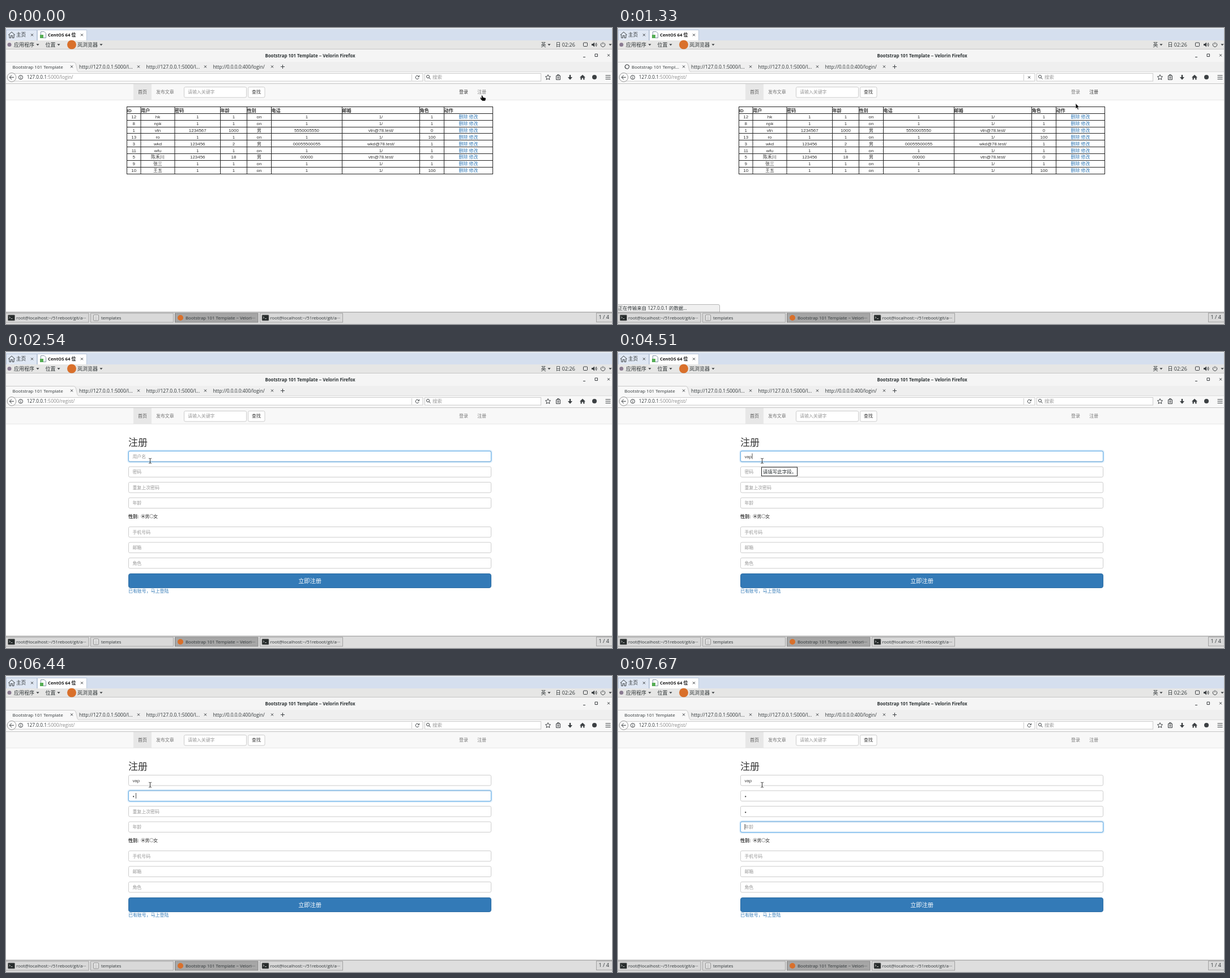
Recreate the animation shown at these times as an HTML page. Size 1070 px wide and 524 px high, loop 8000 ms.

```html
<!DOCTYPE html>
<html lang="zh-CN">
<head>
<meta charset="utf-8">
<title>Registration form</title>
<style>
html, body { margin: 0; width: 100%; height: 100%; overflow: hidden; background: #fff; }
svg { display: block; width: 1070px; height: 524px; }
text { white-space: pre; }
.ui { font: 8.3px "Open Sans", "Noto Sans CJK SC", sans-serif; fill: #2e3436; }
.web { font: 7.93px "Liberation Sans", "Noto Sans CJK SC", sans-serif; fill: #333; }
.panel { font-size: 9px; }
.task { font-size: 7.85px; }
.bold { font-weight: 700; }
.mid { text-anchor: middle; }
.muted { fill: #777; }
.hint { fill: #999; }
.link { fill: #337ab7; }
.line { fill: none; stroke: #3c4043; stroke-width: 1; }
.box { fill: #fff; stroke: #ccc; }
.glow { fill: none; stroke: #66afe9; }
.halo { stroke-width: 2.4; opacity: .65; filter: blur(1.3px); }
.button { fill: #d9d9d9; stroke: #a2a2a2; }
</style>
</head>
<body>
<svg viewBox="0 0 1070 524">
  <defs>
    <path id="x" class="line" d="M-2-2 2 2M2-2-2 2" stroke-width="1.3"/>
    <path id="down" d="M-2.6-1.2H2.6L0 1.8Z" fill="#3c4043"/>
    <g id="terminal">
      <rect width="12" height="10" rx="1" fill="#262b2b" stroke="#777" stroke-width=".8"/>
      <path d="M2 3l2 1.5L2 6M5 6.5h3" fill="none" stroke="#ddd" stroke-width=".8"/>
    </g>
  </defs>

  <g class="ui">
    <rect width="1070" height="23" fill="#d5dfee"/>
    <rect width="1070" height="1.5" fill="#eef2f8"/>
    <rect x=".5" y="3.5" width="54" height="19" fill="#dfe7f3" stroke="#bac7da"/>
    <path d="M55.500 23V3.500H142.500V23" fill="#fff" stroke="#bac7da"/>
    <path d="M4 12.500 10 7l6 5.500M6 11.500V17.500H8.700V13.500H11.300V17.500H14V11.500" class="line" stroke="#34547c"/>
    <text x="18" y="15.3" font-size="8.600">主页</text>
    <path d="M61.500 6.500h6l3 3v8h-9z" fill="#fff" stroke="#8292a6"/>
    <path d="M60 12h6v6h-6z" fill="#55ad54"/>
    <text x="74" y="15.2" class="bold" font-size="7.8" fill="#111">CentOS 64 位</text>
    <g stroke="#6d93c6"><use href="#x" x="46" y="12.300"/><use href="#x" x="134" y="12.300"/></g>

    <rect y="22" width="1070" height="16" fill="#e6e6e5"/>
    <rect y="37" width="1070" height="1" fill="#c6c6c6"/>
    <circle cx="6" cy="29.500" r="3.500" fill="#8a7b91"/>
    <g class="panel">
      <text x="14" y="32.600">应用程序</text>
      <text x="69.500" y="32.600">位置</text>
      <circle cx="116" cy="29.500" r="8" fill="#d9702b"/>
      <text x="126" y="32.600">岚浏览器</text>
      <text x="944.500" y="32.600">英</text>
      <text x="970.500" y="32.600">日 02:26</text>
    </g>
    <use href="#down" x="56" y="29.500"/><use href="#down" x="93" y="29.500"/><use href="#down" x="168" y="29.500"/>
    <use href="#down" x="959" y="29.500"/><use href="#down" x="1067" y="29.500"/>
    <rect x="1019.500" y="26" width="7" height="6.500" rx="1" class="line"/>
    <path d="M1034 28h2l3-2.500v8L1036 31h-2z" fill="#3c4043"/>
    <path d="M1040.500 27.500q1.500 2 0 4M1042 26q2.500 3.500 0 7" class="line" stroke-width=".8"/>
    <path d="M1052 26.500a3.700 3.700 0 1 0 4 0M1054 25v4" class="line"/>

    <rect y="38" width="1070" height="40" fill="#efefef"/>
    <rect y="38" width="1070" height="22" fill="#f5f5f5"/>
    <text x="537" y="52" class="bold mid" font-size="7.900">Bootstrap 101 Template − Velorin Firefox</text>
    <path d="M1019 51.500h4M1040 46h4.500v4.500h-4.500z" class="line" stroke-width="1.300"/>
    <use href="#x" x="1064" y="48.300"/>
    <path d="M0 78V60.500H119q4 0 5 6l1.500 7q1 4.500 5 4.500Z" fill="#f8f8f8"/>
    <path d="M0 60.500H119q4 0 5 6l1.500 7q1 4.500 5 4.500H1070" fill="none" stroke="#c9c9c9"/>
    <text id="tab" y="71.500" font-size="8"></text>
    <g id="spinner">
      <circle r="3.500" class="line" stroke="#c9c9c9"/>
      <path d="M0-3.500A3.500 3.500 0 0 1 3.500 0" class="line" stroke="#555"/>
    </g>
    <text x="129" y="71.500" font-size="8.500">http://127.0.0.1:5000/l...</text>
    <text x="247.500" y="71.500" font-size="8.500">http://127.0.0.1:5000/l...</text>
    <text x="365.500" y="71.500">http://0.0.0.0:400/login/</text>
    <use href="#x" x="116" y="68.400"/><use href="#x" x="234" y="68.400"/>
    <use href="#x" x="352" y="68.400"/><use href="#x" x="470" y="68.400"/>
    <path d="M485 68.500h7M488.500 65v7" class="line" stroke-width="1.400"/>

    <rect y="78" width="1070" height="21" fill="#f8f8f8"/>
    <rect x="14" y="80.500" width="722" height="13.500" class="box" stroke="#bbb"/>
    <rect x="739.500" y="80.500" width="205" height="13.500" class="box" stroke="#bbb"/>
    <circle cx="10" cy="87.300" r="7.800" fill="#fafafa" stroke="#999"/>
    <path d="M14 87.300H6.500M10 83.500 6.300 87.300 10 91" class="line" stroke-width="1.700"/>
    <circle cx="26" cy="87.300" r="3.600" class="line" stroke="#777" stroke-width=".8"/>
    <path d="M26 86.700v2.800M26 85v.9" class="line" stroke="#666"/>
    <text x="36.700" y="90.200" font-size="8.400">127.0.0.1<tspan id="path" fill="#8a8a8a"></tspan></text>
    <path d="M716.500 82v11" stroke="#ccc"/>
    <path id="reload" d="M728.500 85.500a3 3 0 1 0 .5 3M729.500 83.800v2.500h-2.500" class="line" stroke="#777"/>
    <use id="stop" href="#x" x="726" y="87.300"/>
    <circle cx="745" cy="86" r="2.500" class="line" stroke="#777"/><path d="M747 88l2.500 2.700" class="line" stroke="#777"/>
    <text x="753" y="90.300" class="hint" font-size="8.500">搜索</text>
    <path d="M957 82.700l1.400 3 3.200.3-2.400 2.200.7 3.200-2.900-1.700-2.900 1.700.7-3.200-2.400-2.200 3.200-.3z" class="line"/>
    <path d="M971.500 84.500h7v7h-7zM973.500 84v-1.500h3V84M973 87h4M973 89h4" class="line"/>
    <path d="M994.800 83h2.400v4h2.800l-4 4.700-4-4.700h2.800z" fill="#3c4043"/>
    <path d="M1013 87.500l5-4.700 5 4.700h-1.500v4h-2.300v-3h-2.400v3h-2.300v-4z" fill="#3c4043"/>
    <circle cx="1039" cy="87" r="4" fill="#3c4043"/>
    <path d="M1058.500 84h9M1058.500 87.200h9M1058.500 90.400h9" class="line" stroke-width="1.600"/>
    <path d="M0 98.500h1070" stroke="#c4c4c4"/>
  </g>

  <g class="web">
    <rect y="99" width="1070" height="28.500" fill="#f8f8f8"/>
    <path d="M0 127.500h1070" stroke="#e7e7e7"/>
    <rect x="225" y="99" width="32" height="28.500" fill="#e7e7e7"/>
    <text x="233" y="116.400" fill="#555">首页</text>
    <text x="265" y="116.400" class="muted">发布文章</text>
    <rect x="314.500" y="104.500" width="110" height="18.500" rx="2.300" class="box"/>
    <text x="321" y="116.400" class="hint">请输入关键字</text>
    <rect x="427.500" y="104.500" width="29.500" height="18.500" rx="2.300" class="box"/>
    <text x="434" y="116.400">查找</text>
    <text id="login" x="800" y="116.400">登录</text>
    <text id="regist" x="832.300" y="116.400">注册</text>

    <g id="table"></g>

    <g id="form">
      <text x="216" y="166.300" font-size="17" font-weight="500">注册</text>
      <g id="fields"></g>
      <text x="216" y="294.300" class="bold">性别:</text>
      <g fill="#fff" stroke="#888" stroke-width=".8"><circle cx="242" cy="290.700" r="3.300"/><circle cx="257" cy="290.700" r="3.300"/></g>
      <circle cx="242" cy="290.700" r="1.500"/>
      <text x="245.400" y="294.300">男</text><text x="260.200" y="294.300">女</text>
      <rect x="216.500" y="392.500" width="640" height="25" rx="3.400" fill="#337ab7" stroke="#2e6da4"/>
      <text x="536.500" y="408.700" class="mid" fill="#fff" font-size="10.200">立即注册</text>
      <text x="216" y="426.300" class="link">已有账号，马上登陆</text>
      <path id="caret" d="M0-5V5" stroke="#222" stroke-width=".8"/>
    </g>
  </g>

  <g id="tooltip" class="ui">
    <rect x="253.500" y="204" width="63" height="15.500" fill="#fff" stroke="#222"/>
    <text x="255.800" y="215" font-size="8.500">请填写此字段。</text>
  </g>

  <g id="status" class="ui">
    <path d="M-1 489.500H177q2.500 0 2.500 2.500V504H-1z" fill="#f0f0f0" stroke="#b5b5b5"/>
    <text id="statusText" x="0" y="499.300" font-size="8.400"></text>
  </g>

  <g class="ui task">
    <rect y="503" width="1070" height="21" fill="#dedede"/>
    <path d="M0 503h1070" stroke="#8d8d8d"/>
    <rect x="-1" y="505" width="147" height="16" class="button"/>
    <rect x="149.500" y="505" width="146" height="16" class="button"/>
    <rect x="298.500" y="505" width="146.500" height="16" class="button" style="fill:#a6a6a6;stroke:#858585"/>
    <rect x="448.500" y="505" width="146" height="16" class="button"/>
    <use href="#terminal" x="3.500" y="508"/><use href="#terminal" x="452" y="508"/>
    <rect x="154.500" y="508" width="9" height="10" rx="1" fill="#f4f4f4" stroke="#8b8b8b"/>
    <path d="M156 511h6M156 513.500h6M156 516h6" stroke="#999" stroke-width=".8"/>
    <circle cx="308" cy="513" r="5" fill="#d9702b"/>
    <text x="18" y="516.300">root@localhost:~/51reboot/git/a···</text>
    <text x="168" y="516.300" font-size="7.600">templates</text>
    <text x="317" y="516.300">Bootstrap 101 Template − Velori···</text>
    <text x="466.500" y="516.300">root@localhost:~/51reboot/git/a···</text>
    <rect x="1042.500" y="504.500" width="29" height="16" class="button"/>
    <text x="1046.500" y="515.300" font-size="9">1 / 4</text>
  </g>

  <g id="cursor" stroke-linejoin="round">
    <path id="hand" d="M0 0Q1.200-.8 2 .7L3 3.300 7 4.200Q8.300 5 7.500 7L6.500 9.500H1.500L-1.800 6Q-2-.1.500 5.200Z" fill="#000" stroke="#fff" stroke-width=".4"/>
    <path id="arrow" d="M0 0V9.500L2.200 7.500 3.800 11 5.400 10.300 3.800 7H6.800Z" fill="#000" stroke="#fff" stroke-width=".6"/>
    <path id="beam" d="M-2.300-4.500Q0-4.500 0-3 0-4.500 2.300-4.500M0-3.500V3.500M-2.300 4.500Q0 4.500 0 3 0 4.500 2.300 4.500" fill="none" stroke="#222" stroke-width=".9"/>
  </g>
</svg>

<script>
const LOOP = 8000;
const $ = id => document.getElementById(id);
const label = (x, y, text, cls = '') => `<text x="${x}" y="${y}" class="${cls}">${text}</text>`;

function buildTable() {
  const edges = [213.5, 238, 298, 378.5, 425.5, 468.5, 593.5, 730.5, 773.5, 859.5];
  const rows = [
    '12|hk|1|1|on|1|1/|1', '8|npk|1|1|on|1|1/|1',
    '1|vtn|1234567|1000|男|5550005550|vtn@78.test/|0', '13|ro|1|1|on|1|1/|100',
    '3|wkd|123456|2|男|00055500055|wkd@78.test/|1', '11|wfu|1|1|on|1|1/|1',
    '5|陈禾川|123456|18|男|00000|vtn@78.test/|0', '9|张三|1|1|on|1|1/|1',
    '10|王五|1|1|on|1|1/|100'
  ];
  const rowY = i => 139.5 + i * 11.85;
  let lines = edges.map(x => `M${x} 139V258.500`).join('');
  for (let i = 0; i <= 10; i++) lines += `M213 ${Math.floor(rowY(i)) + .5}H860`;
  const head = 'ID|用户|密码|年龄|性别|电话|邮箱|角色|动作'.split('|')
    .map((text, i) => label(edges[i] + .3, 148.6, text, 'bold'));
  const cells = rows.flatMap((row, r) => [...row.split('|'), '删除 修改'].map((text, c) =>
    label((edges[c] + edges[c + 1]) / 2, rowY(r + 1) + 9, text, c === 8 ? 'mid link' : 'mid')));
  $('table').innerHTML = `<path d="${lines}" stroke="#222" fill="none"/>` + head.join('') + cells.join('');
}

const fieldTops = [175.5, 203, 230.5, 258, 309.5, 337, 364.5];
const hints = ['用户名', '密码', '重复上次密码', '年龄', '手机号码', '邮箱', '角色'];

function buildFields() {
  $('fields').innerHTML = fieldTops.map((y, i) => {
    const frame = cls => `<rect x="216.500" y="${y}" width="640" height="18.500" rx="2.300" class="${cls}"/>`;
    return `<g class="focus">${frame('glow halo')}</g>${frame('box')}<g class="focus">${frame('glow')}</g>`
      + label(223.4, y + 12.1, hints[i], 'value hint');
  }).join('');
}

// Each track lists [start time, value]; a value holds until the next start.
const tracks = {
  status: [[0, ''], [120, '127.0.0.1:5000/regist/'], [1060, '正在等待 127.0.0.1 的响应...'],
    [1330, '正在传输来自 127.0.0.1 的数据...'], [1480, '']],
  path: [[0, ':5000/login/'], [1180, ':5000/regist/']],
  spin: [[0, 0], [1180, 120], [1330, 210]],
  focus: [[0, -1], [1480, 0], [5910, 1], [6900, 2], [7520, 2.5], [7670, 3]],
  values: [
    [[0, ''], [3280, 'v'], [3950, 'va'], [4510, 'vap']],
    [[0, ''], [6440, '●']],
    [[0, ''], [7210, '●']]
  ],
  caret: [[0, null], [1480, [224, 0]], [2410, null], [3280, [228, 0]], [3950, [232.5, 0]],
    [4510, [237, 0]], [5910, [224, 1]], [6440, [229.5, 1]], [6900, [224, 2]],
    [7210, [229.5, 2]], [7520, [224, 3]]],
  cursor: [[0, ['hand', 839.5, 119.5]], [120, ['hand', 841, 117]], [250, ['hand', 841, 115.5]],
    [390, ['hand', 842, 115]], [510, ['hand', 843, 114.5]], [630, ['hand', 843.5, 115]],
    [1060, ['hand', 843, 116]], [1180, ['hand', 838.5, 118]], [1330, ['arrow', 808, 133.5]],
    [1480, ['arrow', 727, 158]], [1630, ['arrow', 615, 168]], [1750, ['beam', 500, 186]],
    [1870, ['beam', 405.5, 207]], [2020, ['beam', 340, 217]], [2140, ['arrow', 292, 222]],
    [2260, ['beam', 261, 204]], [2410, ['beam', 256, 193]], [2540, ['beam', 254.5, 192.7]]]
};
const at = (track, t) => track.findLast(([start]) => start <= t)[1];
const show = (el, on) => { el.style.display = on ? '' : 'none'; };
const setText = (el, text) => { if (el.textContent !== text) el.textContent = text; };

buildTable();
buildFields();
const focusMarks = document.querySelectorAll('.focus');
const fieldValues = document.querySelectorAll('.value');

function draw(t) {
  const loading = t >= 1060 && t < 1480;
  show($('table'), t < 1480);
  show($('form'), t >= 1480);
  show($('tooltip'), t >= 3400 && t < 5760);
  show($('spinner'), loading);
  show($('stop'), loading);
  show($('reload'), !loading);
  $('spinner').setAttribute('transform', `translate(16 68.500) rotate(${at(tracks.spin, t)})`);
  $('tab').setAttribute('x', loading ? 24 : 11.5);
  setText($('tab'), loading ? 'Bootstrap 101 Templ...' : 'Bootstrap 101 Template');
  setText($('path'), at(tracks.path, t));

  const status = at(tracks.status, t);
  show($('status'), status);
  $('status').style.opacity = t < 250 ? .5 : 1;
  setText($('statusText'), status);
  $('login').style.fill = t < 1060 ? '#333' : '#777';
  $('regist').style.fill = t >= 120 && t < 1480 ? '#333' : '#777';

  const focus = at(tracks.focus, t);
  focusMarks.forEach((el, i) => {
    el.style.opacity = Math.max(0, 1 - Math.abs(focus - Math.floor(i / 2)));
  });
  tracks.values.forEach((track, i) => {
    const value = at(track, t);
    setText(fieldValues[i], value || hints[i]);
    fieldValues[i].style.fill = value ? '#444' : '';
    fieldValues[i].style.fontSize = value === '●' ? '5.500px' : '';
  });

  const caret = at(tracks.caret, t);
  show($('caret'), caret);
  if (caret) $('caret').setAttribute('transform', `translate(${caret[0]} ${fieldTops[caret[1]] + 9})`);

  const [shape, x, y] = at(tracks.cursor, t);
  for (const id of ['hand', 'arrow', 'beam']) show($(id), id === shape);
  $('cursor').setAttribute('transform', `translate(${x} ${y})`);
}

const start = performance.now();
function tick(now) {
  draw(Math.max(0, now - start) % LOOP);
  requestAnimationFrame(tick);
}
draw(0);
requestAnimationFrame(tick);
</script>
</body>
</html>
```
